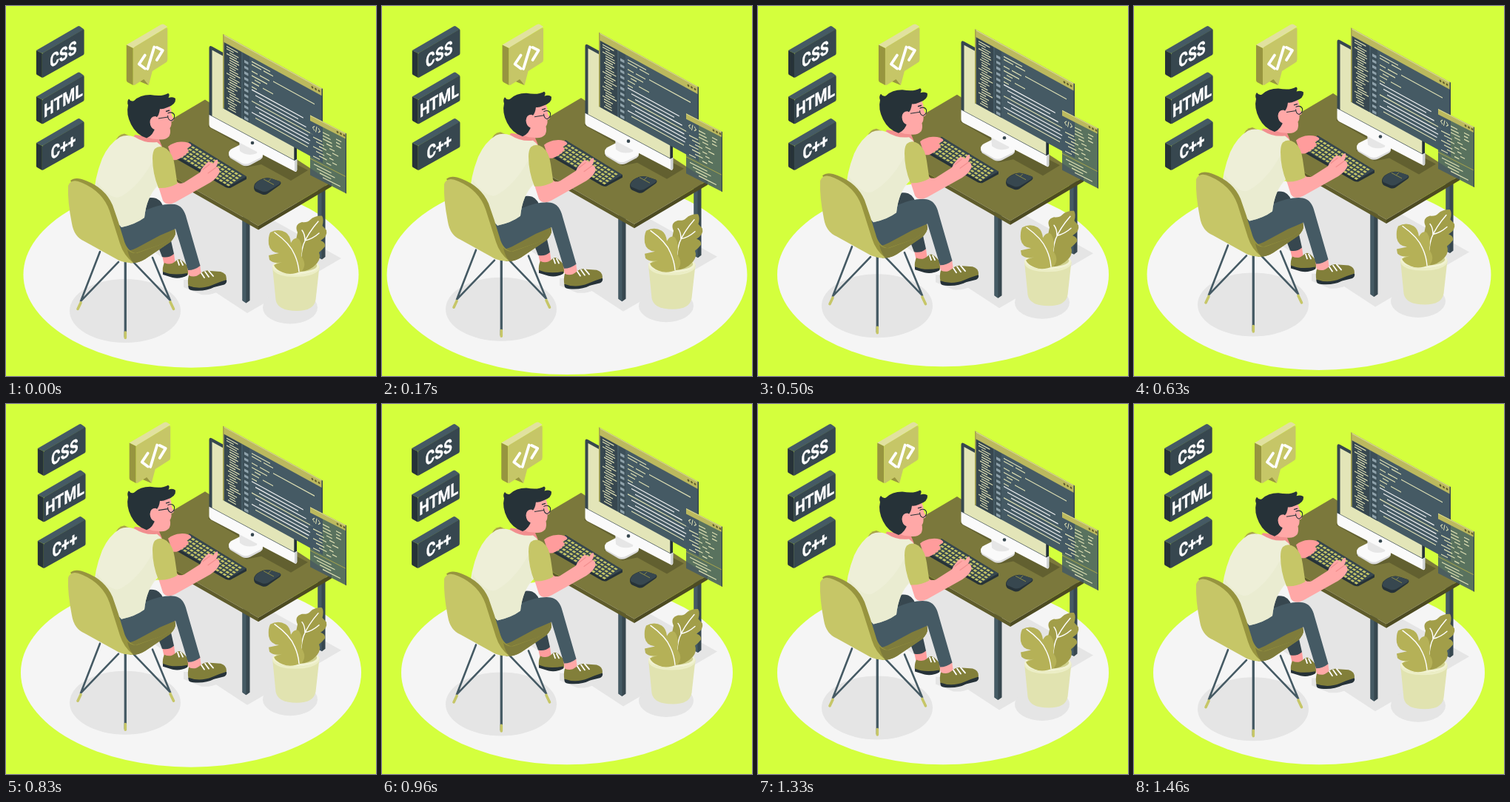
These frames come from a looping animation (500x500 px, 1500 ms). An HTML page:

```html
<!DOCTYPE html>
<html lang="en">
<head>
<meta charset="utf-8">
<title>Programmer at a desk</title>
<style>
  html, body { margin: 0; width: 100%; height: 100%; overflow: hidden; background: #d4ff3d; }
  svg { display: block; width: 100vw; height: 100vh; }
  .tag { font: 700 24.5px Roboto, sans-serif; fill: #fff; stroke: #fff; stroke-width: .4; text-anchor: middle; }
</style>
</head>
<body>
<svg id="stage" viewBox="0 0 500 500">
  <rect width="500" height="500" fill="#d4ff3d"/>
  <ellipse id="floor" cx="250" cy="363" rx="224" ry="124.3" fill="#f5f5f5"/>

  <g id="tags"></g>

  <g id="bubble" stroke-linejoin="round">
    <path d="M163 52.5 L209 25.5 Q212 24 214 25 L218.5 28 L172 57Z" fill="#e1e19f"/>
    <path d="M163 52.5 L172 57 V107 L164.5 103 Q163 102 163 100Z" fill="#97953f"/>
    <path d="M181 102 L193 107 L187 98Z" fill="#97953f"/>
    <path d="M172 59 Q172 56.5 174 55.3 L216 30 Q218.5 28.5 218.5 31 V72 Q218.5 75 216.5 76.3 L198 88 L193 107 L186.5 99 L174.5 106.5 Q172 108 172 105Z" fill="#c6c667"/>
    <path d="M188 66.5 L180 78.5 L188 84.5 M200.5 55.5 L191.5 85 M204 56 L212 60 L204 73" fill="none" stroke="#fff" stroke-width="3.8" stroke-linecap="round"/>
  </g>

  <g id="scene">
    <!-- floor shadows -->
    <g fill="#e5e5e5">
      <path d="M269 238 L453 341 L326 415 L158 305Z"/>
      <ellipse cx="161" cy="412" rx="75" ry="43"/>
      <ellipse cx="384" cy="407.5" rx="37" ry="22"/>
      <path d="M240 370 L298 372 Q290 392 264 390 L240 380Z"/>
    </g>

    <!-- desk -->
    <g>
      <path d="M421.5 240 H431.5 V339 L427 342.5 L421.5 339.5Z" fill="#37474f"/>
      <path d="M421.5 240 H426.5 V342 L421.5 339.5Z" fill="#455a64"/>
      <path d="M319.5 285 H329.5 V398 L324.5 401.5 L319.5 398Z" fill="#37474f"/>
      <path d="M319.5 285 H324.5 V401.5 L319.5 398Z" fill="#455a64"/>
      <path d="M158 192 L341 297 V302.5 L158 198Z" fill="#5f5c2b"/>
      <path d="M341 297 L440 238 V244 L341 302.5Z" fill="#4d4b22"/>
      <path d="M269 126.5 L440 238 L341 297 L158 192Z" fill="#7b783c"/>
      <path d="M273 163 L284 157 L408 222 L385 236 L345 214 L325 218 L300 204 L316 188Z" fill="#626030"/>
    </g>

    <!-- monitor -->
    <path d="M301 200 Q301 196 306 193.5 L321 186 L346 200 Q349 204 344 207.5 L330 215 Q324 217.5 319 215 L304 206 Q301 204 301 200Z" fill="#dcdcdc"/>
    <path d="M301 199 Q301 195 306 192.5 L321 185 L346 199 Q349 202 344 205 L330 212 Q324 215 319 212.5 L304 204 Q301 202 301 199Z" fill="#fafafa"/>
    <path d="M315 180 L340 194 L339 199 Q326 204 316 196Z" fill="#e6e6e6"/>
    <path d="M274.5 57 Q274.5 53 278 54.5 L390 116 Q393 118 393 122 V212 L274.5 150Z" fill="#37474f"/>
    <path d="M278.5 59.5 L389.5 120 V208 L278.5 148.5Z" fill="#e3e5b8"/>
    <path d="M274.5 147 L390 209 L393 207 V222 Q393 225 390 223.5 L277 164.5 Q274.5 163 274.5 160Z" fill="#fafafa"/>
    <path d="M390 209 L393.5 206.5 V222 L390 224Z" fill="#d0d3d4"/>
    <path d="M389.5 118 L393 122 V207 L389.5 208.5Z" fill="#263238"/>
    <circle cx="333" cy="185" r="2.3" fill="#37474f"/>

    <g id="editor" transform="matrix(1 .548 0 1 293 38)"></g>
    <g id="panel" transform="matrix(1 .51 0 1 411 147.5)"></g>

    <!-- keyboard and mouse -->
    <path d="M229 202 L248 183.5 L325 230.5 V234 L303 246 Q300 246.5 297 245 L229 206Z" fill="#263238"/>
    <path d="M229 202 L248 183.5 L325 230.5 L303 242.5 Q300 243 297 241.5Z" fill="#37474f"/>
    <g id="keys" fill="#c6c667"></g>
    <path d="M335 245 Q335 239 343 235 Q350 231 358 233 L370 237 Q373 239 370 242 L353 254 Q350 256 346 254.5 L338 251 Q335 249 335 245Z" fill="#263238"/>
    <path d="M336 243 Q337 238 345 234.5 Q351 231.5 358 233 L370 237 Q372 238.5 369 241 L354 250 Q350 252 346 250.5 L338 247 Q335.5 246 336 243Z" fill="#37474f"/>
    <path d="M348 234 L362 241.5 M358 233.5 L354 237.5" stroke="#8c8a45" fill="none"/>

    <!-- plant -->
    <path d="M360 352 L364.5 397 Q367 412 393 412 Q416 412 418.5 397 L423.5 352Z" fill="#e1e3b0"/>
    <ellipse cx="391.7" cy="352" rx="31.7" ry="11" fill="#f1f2d2"/>
    <ellipse cx="391.7" cy="351" rx="28.5" ry="8.5" fill="#cfd08e"/>
    <path d="M394 306 Q389 295 400 292 Q407 293 411 289 Q417 283 427 283.5 Q430 288 427.5 297 L433 303 Q435 311 425 317 Q432 319 431 325 Q428 329 423 333 Q426 341 420 348 Q410 359 397 359 L386 345Z" fill="#a29e49"/>
    <path d="M422 291 Q408 307 402 322 Q398 335 398 352 M400 303 Q404 308 404 317 Q414 315 423 307" fill="none" stroke="#fff" stroke-width="1.4" stroke-linecap="round"/>
    <path d="M357 306 Q368 300 378 306 Q384 310 385 320 Q390 311 396 315 Q402 324 399 338 Q407 349 400 358 Q385 365 374 360 Q364 356 362 350 L373 346 Q362 349 356 343 L355 337 L369 334 Q357 333 355 322 Q354 312 357 306Z" fill="#b5b157"/>
    <path d="M363 306 Q384 321 390 336 Q395 347 396 359" fill="none" stroke="#fff" stroke-width="1.4" stroke-linecap="round"/>
    <path d="M360 353 Q366 363 391 363 Q417 363 423.5 353 V356 Q416 366 391 366 Q366 366 360.300 356Z" fill="#eceec6"/>

    <!-- far leg, far arm -->
    <path d="M211 337 L227 335 L229 349 L214 351Z" fill="#ff9c9c"/>
    <path d="M214 347 Q222 351 229 345 Q233 340 238 344 L246 352 V363 Q236 369 225 366 L212 361 Q211 353 214 347Z" fill="#827f3a"/>
    <path d="M212 359 Q225 365 245 361 V364 Q235 369.5 225 367 L212 363Z" fill="#263238"/>
    <path d="M183 264 Q192 257 203 260 Q212 264 214 277 L227 335 Q220 341 211 339 L192 290Z" fill="#37474f"/>
    <path d="M219 190 Q226 184 236 183.5 Q246 183 250 187 Q251 190 244 192 L247 195 Q245 200 238 204 Q232 209 225 208Z" fill="#ff9c9c"/>

    <!-- chair legs -->
    <g stroke-width="2.6" stroke="#455a64" stroke-linecap="round">
      <path d="M127 332 L101 399 M152 346 L101 399 M172 346 L222 398 M198 340 L222 398" fill="none"/>
      <path d="M161.3 346 V447" fill="none" stroke-width="3.3"/>
      <path d="M101 401 L97 409.5 M222 400 L226.5 409.5 M161.3 441 V448.5" stroke="#c6c667" stroke-width="3.6"/>
    </g>

    <!-- near leg -->
    <path d="M245 354 L262 349 L264 363 L248 369Z" fill="#ffa8a7"/>
    <path d="M247 364 Q255 368 262 362 Q268 356 276 358 L290 359 Q298 361 298 369 Q297 375 285 378 Q272 385 254 383 Q247 383 246.5 379 Q245 371 247 364Z" fill="#827f3a"/>
    <path d="M246.5 378 Q262 384 279 377 Q288 373 298 370 Q299 374 295 376.5 L281 380 Q270 386 253 384.5 Q246.5 384 246.5 380Z" fill="#263238"/>
    <path d="M264 361 L268 367 M269 359 L274 366 M274 358 L280 365 M232 344 L234 350 M236 344 L239 350" stroke="#fff" stroke-width="1.8" stroke-linecap="round"/>
    <path d="M160 329 Q162 317 180 313 L219 296 Q229 296 229 305 Q230 311 222 318 L188 341 Q176 349 167 347Z" fill="#7f7c3b"/>
    <path d="M150 294 L188 276 Q212 266 228 268 Q240 270 244 287 L262.500 351 Q255 357 246 357 L229 301 Q220 305 208 310 L182 324 Q170 331 163 331Z" fill="#455a64"/>

    <!-- torso -->
    <path d="M148 184 Q150 174 160 172.5 L170 177Z" fill="#a8a44b"/>
    <path d="M174 174 L206 178 L211 190 L190 194 L170 182Z" fill="#f28f8f"/>
    <path d="M154 177 Q163 173 174 177 Q188 186 204 184 Q213 190 214 200 L205 243 Q190 258 187 286 Q175 295 156 299 L119 258 Q119 234 130 206 Q139 186 154 177Z" fill="#eeefd8"/>
    <path d="M122 236 Q143 265 156 257 Q180 243 198 210 L204 243 Q190 258 187 286 Q175 295 156 299 L122 262Z" fill="#e9ebcf" opacity=".7"/>

    <!-- chair back -->
    <path d="M87 236 Q94 230 108 236 Q134 246 144 269 Q152 291 159 315 Q163 331 175 334 L210 322 Q220 317 229 305 Q229 312 222 319 L188 342 Q175 350 160 344Z" fill="#97943f"/>
    <path d="M84 243 Q88 232 103 239 Q131 251 140 277 Q148 302 154 321 Q159 337 172 347 Q163 348 153 344 L106 318 Q92 312 89 294 Q83 264 84 243Z" fill="#c6c667"/>
    <path d="M164 329 Q169 335 177 334 L210 322 Q220 317 229 305 Q229 312 222 319 L188 342 Q178 348 172 347 Q166 340 164 329Z" fill="#7f7c3b"/>

    <!-- near arm -->
    <path d="M205 241 L231 237 Q233 241 240 239 L262 225 Q266 216 274 210 L280 213 Q283 207 286 208 Q287 213 284 217 Q290 219 288 226 Q284 235 270 242 L229 265 Q217 271 212 263Z" fill="#ffa8a7"/>
    <path d="M266 221 L275 214 M273 226 L284 218" stroke="#f28f8f" stroke-width="1.2" stroke-linecap="round"/>
    <path d="M201 193 Q208 187 217 193 Q226 200 228 216 L231.5 240 Q219 247 206 246 Q198 226 198 206 Q198 197 201 193Z" fill="#c6c667"/>

    <!-- head -->
    <path d="M190 142 L221 134 Q224 140 224 147 L227 153.5 Q226 156 223.5 156 Q224 162 221.5 165 Q223 171 220.5 176 Q215 182 205 180 Q190 180 184 170Z" fill="#ffa8a7"/>
    <path d="M165 134 Q163 129 166 125.5 Q169 130 173 128 Q181 120 195 120 Q211 123 219 118 Q222 119 219.5 124 Q226 122 229 125 Q230 133 218 137 Q211 140 208 139 Q207 148 203 151 L202 163 Q199 175 190 178.5 Q176 174 169 160 Q162 146 165 134Z" fill="#263238"/>
    <path d="M194.5 157 Q195 149 202 149 Q207 151 206 158 Q206 166 201 167 Q195 165 194.5 157Z" fill="#ffa8a7"/>
    <path d="M206 152 L219 150 M218.500 145 Q225 142 227.5 147 Q228.500 153 223 155 Q219 154 218.5 148" fill="none" stroke="#263238" stroke-width="1.1"/>
    <path d="M216 142.5 L221 141" stroke="#263238" stroke-width="1.4"/>
  </g>
</svg>

<script>
const LOOP = 1500, DELAY = 16, RATE = 1.015;
const $ = id => document.getElementById(id);
const floor = $("floor"), tags = $("tags"), bubble = $("bubble"), scene = $("scene");

let seed = 7;
const rand = () => (seed = (seed * 16807) % 2147483647) / 2147483647;

const rect = (x, y, w, h, fill) =>
  `<rect x="${x}" y="${y}" width="${w}" height="${h}" fill="${fill}"/>`;
const line = (x, y, w, fill = "#dfe0b4") => rect(x, y, w, 1.3, fill);
const dots = (x, y) =>
  [0, 4.5, 9].map(d => `<circle cx="${x + d}" cy="${y}" r="1.4" fill="#5f5c2b"/>`).join("");

function drawTags() {
  tags.innerHTML = ["CSS", "HTML", "C++"].map((word, i) => `
    <g transform="translate(0 ${i * 62.5})">
      <path d="M41 60 L97 27.5 Q98.5 26.7 100 27.5 L105.5 31.5 L49 64Z" fill="#455a64"/>
      <path d="M41 60 L49 64 V97 L42 93 Q41 92.4 41 91Z" fill="#263238"/>
      <path d="M49 66 Q49 64 50.5 63 L104 32 Q105.7 31 105.7 33 V64 Q105.7 65.5 104.5 66.2 L50.5 96.5 Q49 97.3 49 95.5Z" fill="#37474f"/>
      <text class="tag" transform="matrix(.79 -.456 0 1 77.5 73.5)">${word}</text>
    </g>`).join("");
}

function drawEditor() {
  let s = rect(0, 0, 135, 100, "#455a64") + rect(2, 10, 23, 90, "#37474f") +
    rect(27, 10, 9, 90, "#3d5059") + rect(0, 0, 135, 10, "#bcb95e") +
    rect(0, 0, 135, 1.2, "#dcdb95") + rect(0, 0, 1.6, 100, "#a8a54c") + dots(121, 5.5);
  for (let v = 13; v < 97; v += 3.3) {
    const u = 5 + Math.floor(rand() * 3) * 2;
    s += line(u, v, 8 + rand() * 8);
  }
  for (let v = 19; v < 96; v += 7.6) s += rect(29, v, 5.5, 3.6, "#8fa2ab");
  const rows = [
    [15, 39, 64], [19, 39, 52], [19, 55, 68], [26, 68, 124], [28, 39, 47], [28, 50, 63],
    [34, 39, 60], [38, 43, 51], [43, 39, 49], [43, 54, 68], [49, 39, 46]
  ];
  for (const [v, a, b] of rows) s += line(a, v, b - a);
  for (let i = 0; i < 8; i++) {
    const u = 39 + (i % 3) * 5;
    s += line(u, 53 + i * 5.1, 126 - u - rand() * 26, i % 4 == 3 ? "#dfe0b4" : "#f5f5f5");
  }
  $("editor").innerHTML = s + rect(133.5, 0, 1.5, 100, "#37474f");
}

function drawPanel() {
  let s = `<g opacity=".85">${rect(0, 0, 49, 81, "#455a64")}</g>` +
    rect(0, 0, 49, 7.5, "#bcb95e") + rect(0, 0, 49, 1, "#dcdb95") + dots(37, 4) +
    `<path d="M6 12 L3.5 15 L6 18 M9 11 L7.5 19 M11 12 L13.5 15 L11 18" fill="none" stroke="#dfe0b4"/>`;
  for (let i = 0; i < 10; i++) {
    const u = i < 3 ? 17 : 4 + (i % 3) * 4, v = 14 + i * 4.3;
    s += line(u, v, 7 + rand() * 6) + line(u + 18, v, 4 + rand() * 6);
  }
  s += rect(0, 58, 49, 1, "#a8a54c");
  for (let i = 0; i < 4; i++) s += line(5 + i * 4, 63 + i * 4, 14 + rand() * 12);
  $("panel").innerHTML = s + rect(47.8, 0, 1.2, 81, "#37474f");
}

function drawKeys() {
  let s = "";
  for (let r = 0; r < 5; r++)
    for (let c = 0; c < 15; c++) {
      const x = 247.5 - r * 3.9 + c * 4.85, y = 186.5 + r * 3.1 + c * 2.93;
      s += `<path d="M${x} ${y} l3.4 2 l-2.5 1.6 l-3.4 -2Z"/>`;
    }
  $("keys").innerHTML = s;
}

// linear interpolation through [time fraction, value] stops
function track(stops, p) {
  let i = 1;
  while (i < stops.length - 1 && p > stops[i][0]) i++;
  const [t0, a] = stops[i - 1], [t1, b] = stops[i];
  return a + (b - a) * (p - t0) / (t1 - t0);
}

const beat = [[0, 1], [.1, 1.1], [.3, 1], [.4, 1], [.5, 1.1], [.6, 1], [1, 1]];
const lift = [[0, 0], [.5, -10], [1, 0]];
const shake = [0, -1, 2, -4, 4, -4, 4, -4, 2, -1, 0].map((v, i) => [i / 10, v]);

function update(now) {
  const t = now % LOOP;
  const p = Math.min(DELAY + t * RATE, LOOP + DELAY) / LOOP % 1;
  const k = track(beat, p), dx = track(shake, p);
  floor.setAttribute("rx", 224 * k);
  floor.setAttribute("ry", 124.3 * k);
  tags.setAttribute("transform", `translate(${dx} 0)`);
  bubble.setAttribute("transform", `translate(${dx * 2} 0)`);
  scene.setAttribute("transform", `translate(0 ${track(lift, p) + .2})`);
}

function loop() {
  update(performance.now());
  requestAnimationFrame(loop);
}

drawTags();
drawEditor();
drawPanel();
drawKeys();
loop();
</script>
</body>
</html>
```
